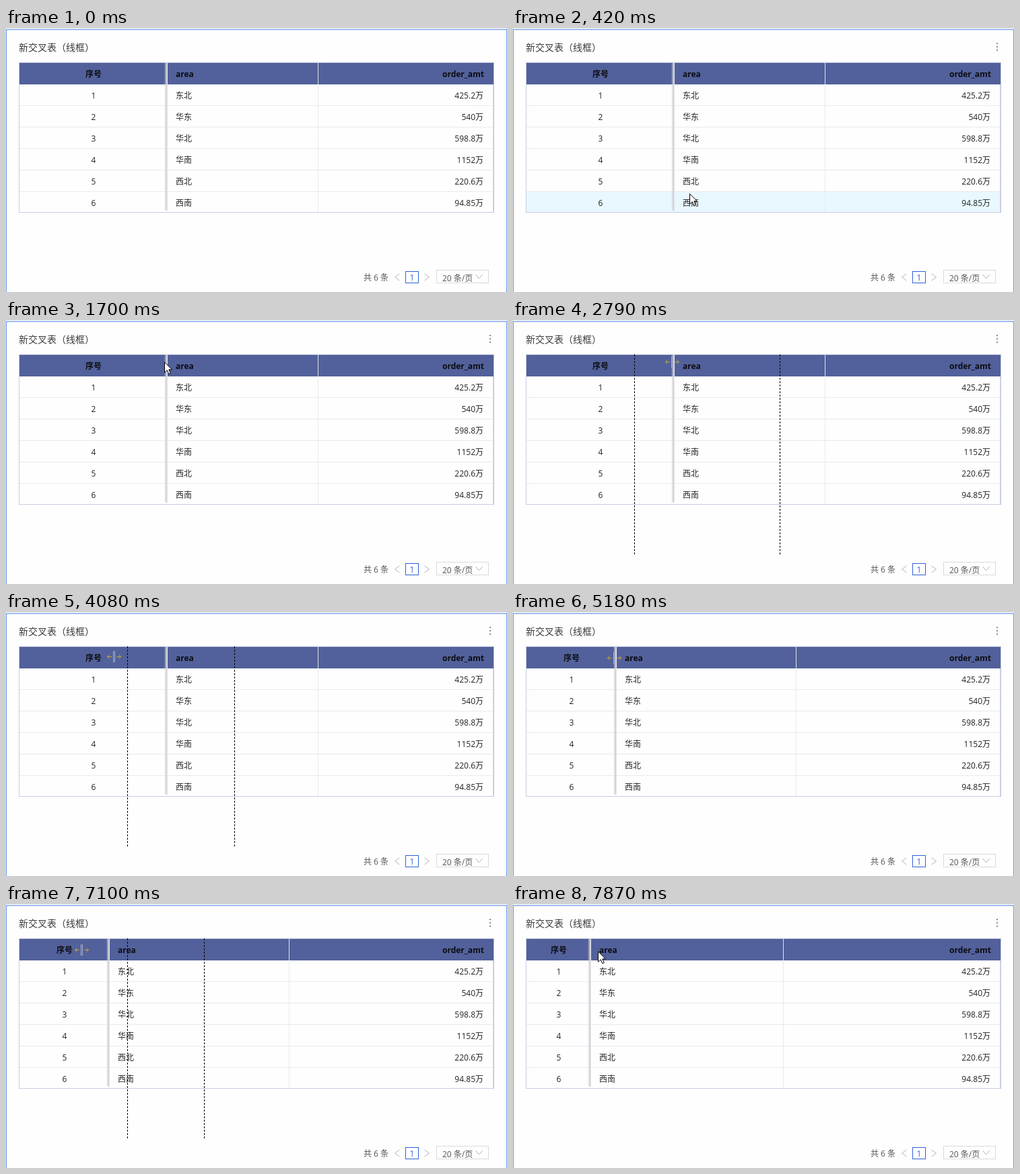
An HTML page that plays this animation: 744x393 px, repeating every 7.99 s.

```html
<!DOCTYPE html>
<html lang="zh">
<head>
<meta charset="utf-8">
<title>新交叉表</title>
<style>
  html, body { margin: 0; width: 100%; height: 100%; overflow: hidden; background: #fff; }
  body { position: relative; font: 12px/34px "Open Sans", "Noto Sans CJK SC", "Noto Sans CJK", sans-serif; color: #222; }
  body * { box-sizing: border-box; }
  div, svg { position: absolute; white-space: nowrap; }
  #stage { left: 0; top: 0; width: 744px; height: 393px; overflow: hidden; background: #e3e9f5; }
  #card { left: 0; top: 2px; width: 744px; height: 400px; background: #fefefe; border: 1px solid #6a9af0; }
  #title { left: 19px; top: 12px; font-size: 14px; color: #3a3a3a; }
  #table { left: 19px; top: 51px; width: 706px; height: 224px; border: 1px solid #c6cde0; overflow: hidden; }
  .row { left: 0; width: 704px; height: 32px; border: 0 solid #e8eaee; border-width: 0 1px 1px 0; border-right-color: #cdd1e6; }
  .row.hover { background: #e8f8fe; }
  .head { background: #52619b; border-color: #52619b; color: #0c0c10; font-weight: 700; }
  .no { left: 0; top: 0; text-align: center; }
  .area { top: 0; }
  .amt { right: 14px; top: 0; }
  .head .amt { right: 13px; }
  .sep { top: 0; width: 1px; height: 32px; background: #e9eaef; }
  .head .sep { background: #dfe2ee; }
  #grip { top: 0; width: 5px; height: 220px; border-radius: 0 0 0 4px;
    background: linear-gradient(90deg, rgba(205,205,212,0), rgba(205,205,212,.7) 45%, #cdcdd3 78%, #e6e6ec 82%); }
  #total { left: 531px; top: 355px; color: #555; }
  #page { left: 593px; top: 362px; width: 20px; height: 18px; border: 1px solid #2f62d9; color: #2f62d9; text-align: center; line-height: 18px; }
  #size { left: 639px; top: 360px; width: 78px; height: 20px; border: 1px solid #d9d9d9; padding-left: 8px; line-height: 24px; color: #555; }
  .guide { top: 51px; height: 298px; border-left: 1px dashed #000; }
  #tip { left: 160px; top: 83px; width: 40px; height: 25px; border: 1px solid #c4c4c4; background: #fff; color: #575757; text-align: center; line-height: 22px; }
  #arrow, #resize { left: 0; top: 0; }
</style>
</head>
<body>
<div id="stage">
  <div id="card"></div>
  <div id="title">新交叉表（线框）</div>
  <svg id="menu" style="left:716px;top:22px" width="6" height="16" fill="#8a8a96">
    <path d="M2 0h2v2H2zM2 5h2v2H2zM2 10h2v2H2z"/>
  </svg>
  <div id="table"></div>
  <div id="total">共 6 条</div>
  <div id="page">1</div>
  <div id="size">20 条/页</div>
  <svg style="left:570px;top:360px" width="150" height="22" fill="none" stroke="#b4b4b4">
    <path d="M14.5 6l-7 5 7 5M51.5 6l7 5-7 5M127.5 7l5 6 5-6"/>
  </svg>
  <div id="tip">area</div>
  <div class="guide" id="from" style="left:180px"></div>
  <div class="guide" id="to"></div>
  <svg id="resize" width="21" height="17" fill="none" shape-rendering="crispEdges">
    <path d="M9.5 0v17M11.5 0v17" stroke="#a9b1cf"/>
    <path d="M0 8.5h7M14 8.5h7" stroke="#c2a63c"/>
    <path d="M3.5 5.5l-3 3 3 3M17.5 5.5l3 3-3 3" stroke="#c2a63c" shape-rendering="auto"/>
  </svg>
  <svg id="arrow" width="13" height="20">
    <path d="M.5 .8V16.2L4.2 12.7 6.8 18.5 9.3 17.4 6.8 11.8H11.4Z" fill="#fff" stroke="#000"/>
  </svg>
</div>
<script>
const LOOP = 7990, TICK = 130;
const HANDLE = 180, GAP = 23;
const $ = id => document.getElementById(id);

const move = (at, steps, x, y) => ({ at, steps, x, y });
const moves = [
  move(270, 1, 305, 344), move(420, 1, 262, 246), move(570, 1, 226, 98),
  move(700, 1, 226, 76), move(850, 2, 241, 68), move(1270, 2, 238, 62),
  move(1700, 1, 235, 62), move(2250, 1, 226, 54), move(2930, 8, 150, 58),
  move(4510, 3, 140, 60), move(6320, 3, 112, 64), move(6710, 2, 104, 61),
  move(7100, 1, 102, 60), move(7870, 1, 126, 70)
];
const drags = [
  { start: 2790, settle: 3470, end: 5180 },
  { start: 6170, settle: 6560, end: 7590 }
];

const data = [
  ["序号", "area", "order_amt"],
  ["1", "东北", "425.2万"], ["2", "华东", "540万"], ["3", "华北", "598.8万"],
  ["4", "华南", "1152万"], ["5", "西北", "220.6万"], ["6", "西南", "94.85万"]
];
const table = $("table");
table.innerHTML = data.map(([no, area, amt], i) =>
  `<div class="row${i ? "" : " head"}" style="top:${i * 32}px">
    <div class="no">${no}</div><div class="area">${area}</div>
    <div class="amt">${amt}</div><div class="sep"></div></div>`
).join("") + '<div id="grip"></div>';
const rows = [...table.querySelectorAll(".row")];

const show = (id, on) => { $(id).style.visibility = on ? "visible" : "hidden"; };
const setAll = (cls, prop, px) =>
  table.querySelectorAll(cls).forEach(el => { el.style[prop] = px + "px"; });

// Each move eases out, sampled once per tick
function pointer(t) {
  let p = null;
  for (const m of moves) {
    if (t < m.at) break;
    const k = Math.min(1, (Math.floor((t - m.at) / TICK) + 1) / m.steps);
    const e = 1 - (1 - k) ** 2;
    const from = p || m;
    p = {
      x: Math.round(from.x + (m.x - from.x) * e),
      y: Math.round(from.y + (m.y - from.y) * e)
    };
  }
  return p;
}

const dragged = (d, t) => pointer(t).x - pointer(d.start).x;

const splitAt = t => drags.reduce((x, d) => t < d.end ? x : x + dragged(d, d.end), 239);

// The guide jumps once, to where the pointer was a tick before
function guideAt(t) {
  const d = drags.find(d => t >= d.start && t < d.end);
  if (!d) return 0;
  const shift = t < d.settle ? 0 : dragged(d, d.settle - TICK);
  return HANDLE + splitAt(t) - GAP + shift;
}

// The highlight trails the pointer
function hoverAt(t) {
  const now = pointer(t), before = pointer(t - TICK);
  if (!before) return 0;
  const row = Math.floor((now.y * 3 + before.y) / 4 / 32 - 52 / 32);
  return row < rows.length ? row : 0;
}

let lastSplit = 0;
function layout(x) {
  if (x === lastSplit) return;
  lastSplit = x;
  const left = x - 20;
  setAll(".no", "width", left + 1);
  setAll(".area", "left", left + 13);
  setAll(".sep", "left", Math.floor(344 + x / 2) - 20);
  $("grip").style.left = left - 4 + "px";
}

function draw(t) {
  layout(splitAt(t));
  const hover = t < 420 ? 0 : hoverAt(t);
  rows.forEach((el, i) => el.classList.toggle("hover", i > 0 && i === hover));

  const p = pointer(t);
  const resizing = t >= 2250 && t < 7870;
  show("arrow", p && !resizing);
  show("resize", resizing);
  if (p) $(resizing ? "resize" : "arrow").style.transform = `translate(${p.x}px,${p.y}px)`;

  const x = guideAt(t);
  show("from", x);
  show("to", x);
  $("to").style.left = x + "px";
  show("menu", t >= 420);
  show("tip", t >= 5620 && t < 6170);
}

const start = performance.now();
function tick() {
  draw((performance.now() - start) % LOOP);
  requestAnimationFrame(tick);
}
tick();
</script>
</body>
</html>
```
